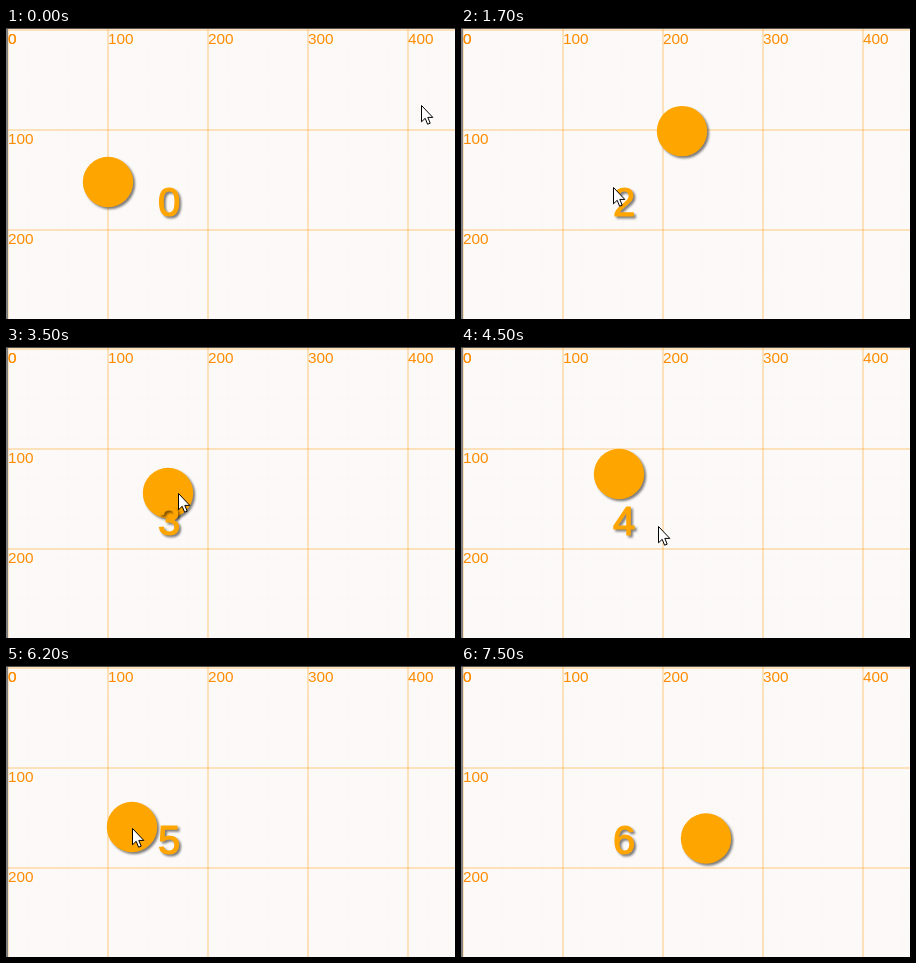
An HTML page that plays this animation: 449 px wide and 291 px high, repeating every 7.6 s.

```html
<!DOCTYPE html>
<html lang="en">
<head>
<meta charset="utf-8">
<title>Falling ball</title>
<style>
  html, body { margin: 0; width: 100%; height: 100%; overflow: hidden; background: #fbfaf8; }
  svg { display: block; }
  text { font-family: "Liberation Sans", Arial, sans-serif; }
  .label { font-size: 15.3px; fill: #ff8c00; }
  .shadow { filter: drop-shadow(2px 2px 1.2px rgba(0, 0, 0, .5)); fill: #ffa500; }
  #count { font-size: 40px; stroke: #ffa500; stroke-width: 1.2px; }
</style>
</head>
<body>
<svg width="449" height="291" viewBox="0 0 449 291">
  <rect width="449" height="291" fill="#fbfaf8"/>
  <g id="grid" stroke="#ff9a10"></g>
  <path d="M1 0V291" stroke="#808080" stroke-width="2"/>
  <path d="M0 .5H449" stroke="#505050"/>
  <g id="labels"></g>
  <circle id="ball" class="shadow" r="25.2"/>
  <text id="count" class="shadow" x="152" y="188"></text>
  <path id="cursor" d="M.5 .5V16.8L4.2 13.3L6.6 19.2L9.2 18.2L6.8 12.4H11.8Z" fill="#fff" stroke="#000" stroke-linejoin="round"/>
</svg>
<script>
const LOOP = 7600, STEP = 100, ORIGIN = 2;
const TOP = 102, SPEED = 0.055;
const ARRIVE = 0.32, LEAVE = 0.8, HIDE_CURSOR = 6950;

// A click restarts the fall at x; the pointer then waits at rest until the next click.
const drops = [
  { start: -945, x: 102, rest: [415, 77] },
  { start: 670, x: 157, rest: [129, 179] },
  { start: 1680, x: 221, rest: [229, 176] },
  { start: 2700, x: 162, rest: [172, 146] },
  { start: 4045, x: 158, rest: [197, 179] },
  { start: 5127, x: 126, rest: [409, 112] },
  { start: 6218, x: 245, rest: [421, 100] }
];

const $ = id => document.getElementById(id);
const ball = $("ball"), count = $("count"), cursor = $("cursor");

function add(parent, tag, attrs, text = "") {
  const el = document.createElementNS("http://www.w3.org/2000/svg", tag);
  for (const key in attrs) el.setAttribute(key, attrs[key]);
  el.textContent = text;
  parent.append(el);
}

function drawGrid() {
  const label = (x, y, value) => add($("labels"), "text", { class: "label", x, y }, value);
  for (let d = 0; d < 449; d += 10) {
    const major = d % 100 === 0, p = d + ORIGIN;
    const style = major ? { "stroke-width": 1.5, opacity: .35 } : { "stroke-width": 1, opacity: .02 };
    add($("grid"), "path", { d: `M${p} 0V291`, ...style });
    if (d < 291) add($("grid"), "path", { d: `M0 ${p}H449`, ...style });
    if (major) {
      label(p, 16, d);
      if (d < 291) label(ORIGIN, p + 14, d);
    }
  }
}

const fallY = (drop, t) => TOP + (t - drop.start) * SPEED;

// Where the pointer hits the falling ball at time t.
const hitPoint = (drop, t) => [drop.x - 6, fallY(drop, t) + 1];

function glide(from, to, u) {
  const c = Math.min(1, Math.max(0, u)), k = c * c * (3 - 2 * c);
  return from.map((v, i) => Math.round(v + (to[i] - v) * k));
}

function pointerAt(t, n) {
  const drop = drops[n], { start, rest } = drop;
  const next = drops[n + 1], end = next ? next.start : LOOP;
  const u = (t - start) / (end - start);
  if (next && u > LEAVE) return glide(rest, hitPoint(drop, end), (u - LEAVE) / (1 - LEAVE));
  return n ? glide(hitPoint(drops[n - 1], start), rest, u / ARRIVE) : rest;
}

function render(t) {
  const n = drops.filter(d => d.start <= t).length - 1;
  ball.setAttribute("cx", drops[n].x);
  ball.setAttribute("cy", fallY(drops[n], t));
  count.textContent = n;
  cursor.setAttribute("transform", `translate(${pointerAt(t, n)})`);
  cursor.setAttribute("visibility", t < HIDE_CURSOR ? "visible" : "hidden");
}

drawGrid();
const begin = performance.now();
function tick() {
  const t = (performance.now() - begin) % LOOP;
  render(Math.floor(t / STEP) * STEP);
  requestAnimationFrame(tick);
}
tick();
</script>
</body>
</html>
```
